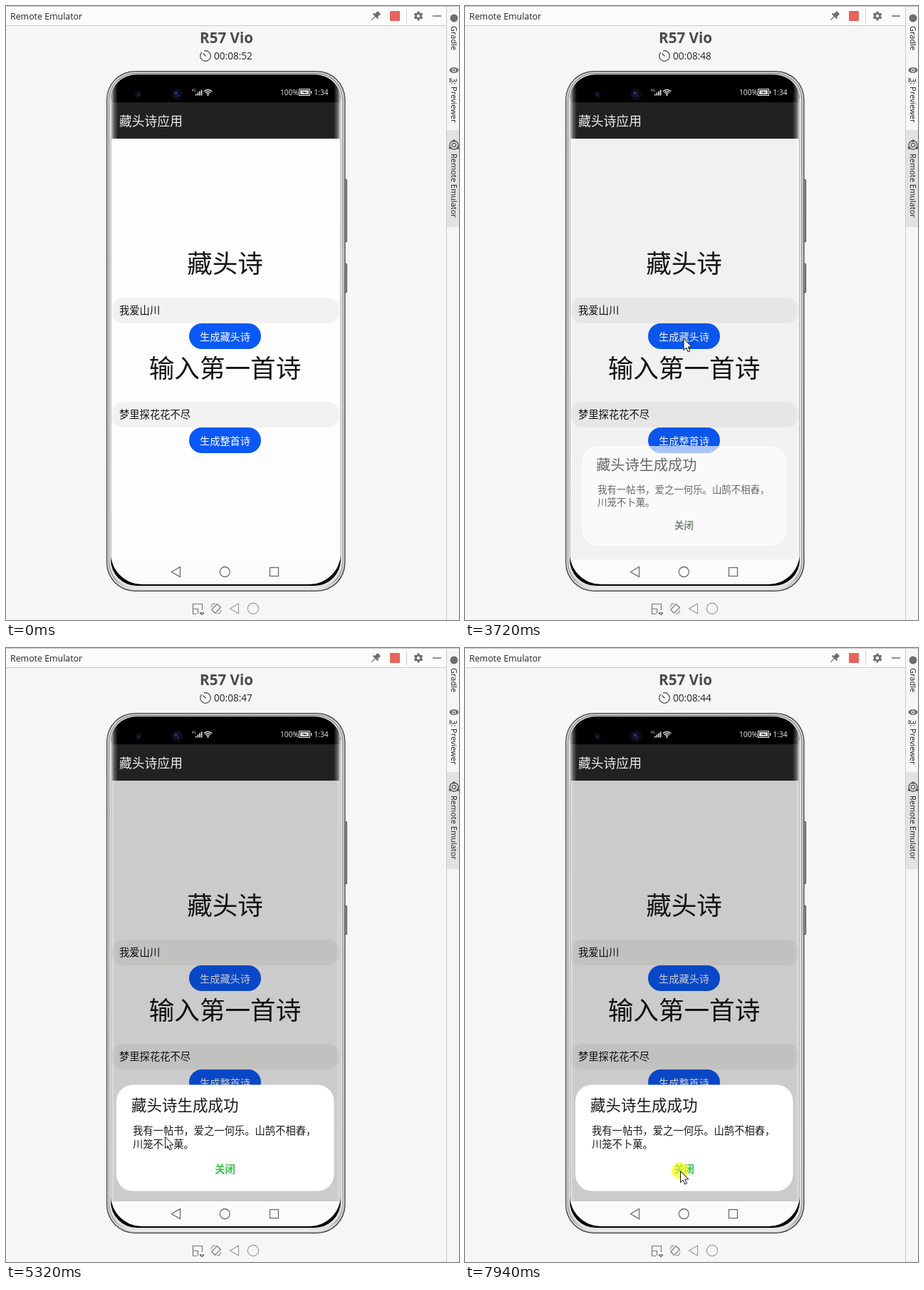
Animation, 636 px wide and 861 px high, one loop 8000 ms. Source, as an HTML page with a canvas:

```html
<!DOCTYPE html>
<html lang="zh-CN">
<head>
<meta charset="utf-8">
<title>Remote Emulator</title>
<style>
html, body { margin: 0; width: 100%; height: 100%; overflow: hidden; background: #f5f5f5; }
canvas { display: block; }
</style>
</head>
<body>
<canvas id="stage" width="636" height="861"></canvas>
<script>
const ctx = document.getElementById('stage').getContext('2d');
const LOOP = 8000;
const LATIN = '"Open Sans", "Noto Sans", sans-serif';
const CJK = '"Noto Sans CJK SC", "Noto Sans CJK", sans-serif';

// Cursor tip: time, x, y
const PATH = [
  [330, 609, 787], [540, 583, 690], [840, 583, 690], [1030, 539, 587],
  [1160, 539, 587], [1560, 549, 520], [1720, 549, 520], [2310, 306.5, 466],
  [4390, 306.5, 466], [4840, 404, 690], [4940, 404, 690], [5320, 223, 685],
  [5390, 223, 685], [5460, 177, 690], [5590, 208, 697], [5830, 208, 697],
  [6490, 313, 687], [6560, 313, 687], [6630, 351, 687], [6840, 409, 690],
  [7470, 304, 737], [7540, 302, 733], [8000, 302, 733]
];

// Dialog: time, scale, opacity, scrim
const DIALOG = [
  [3650, 0.9, 0.25, 0.015], [3720, 0.938, 0.65, 0.047],
  [3790, 1, 1, 0.173], [3910, 1, 1, 0.2]
];

const clamp = v => Math.max(0, Math.min(1, v));

function along(keys, t) {
  let i = 0;
  while (i < keys.length - 2 && t >= keys[i + 1][0]) i++;
  const a = keys[i], b = keys[i + 1], k = clamp((t - a[0]) / (b[0] - a[0]));
  return [a[1] + (b[1] - a[1]) * k, a[2] + (b[2] - a[2]) * k];
}

function box(x, y, w, h, color) {
  ctx.fillStyle = color;
  ctx.fillRect(x, y, w, h);
}

function round(x, y, w, h, r, color) {
  ctx.beginPath();
  ctx.roundRect(x, y, w, h, r);
  ctx.fillStyle = color;
  ctx.fill();
}

function disc(x, y, r, color) {
  ctx.beginPath();
  ctx.arc(x, y, r, 0, Math.PI * 2);
  ctx.fillStyle = color;
  ctx.fill();
}

function ring(x, y, r, color, width = 1.2) {
  ctx.beginPath();
  ctx.arc(x, y, r, 0, Math.PI * 2);
  ctx.strokeStyle = color;
  ctx.lineWidth = width;
  ctx.stroke();
}

function line(points, color, width = 1.2, closed = false) {
  ctx.beginPath();
  points.forEach(p => ctx.lineTo(...p));
  if (closed) ctx.closePath();
  ctx.strokeStyle = color;
  ctx.lineWidth = width;
  ctx.stroke();
}

function text(str, x, y, size, color, { weight = 400, align = 'left', family = LATIN } = {}) {
  ctx.font = `${weight} ${size}px ${family}`;
  ctx.textAlign = align;
  ctx.fillStyle = color;
  ctx.fillText(str, x, y);
}

// Chinese text placed by its vertical middle
function han(str, x, middle, size, color, options = {}) {
  text(str, x, middle + size * 0.38, size, color, { family: CJK, ...options });
}

function gradient(x0, y0, x1, y1, ...stops) {
  const g = ctx.createLinearGradient(x0, y0, x1, y1);
  stops.forEach(([at, color]) => g.addColorStop(at, color));
  return g;
}

function downward(str, x, y) {
  ctx.save();
  ctx.translate(x, y);
  ctx.rotate(Math.PI / 2);
  text(str, 0, 0, 11, '#1d1d1d');
  ctx.restore();
}

function drawToolbar() {
  box(0, 0, 636, 861, '#f6f6f6');
  box(0, 0, 618, 27, '#fcfcfc');
  box(0, 0, 636, 1, '#c4c4c4');
  box(0, 27, 618, 1, '#cccccc');
  text('Remote Emulator', 6, 19, 12.4, '#222');

  ctx.save();
  ctx.translate(519, 14);
  ctx.rotate(Math.PI / 4);
  box(-3, -7, 6, 7, '#6e6e6e');
  box(-5, -1, 10, 2, '#6e6e6e');
  box(-0.6, 0, 1.2, 8, '#6e6e6e');
  ctx.restore();

  round(539, 7, 14, 14, 1, '#e8635b');
  box(562, 4, 1, 20, '#d2d2d2');
  ring(579, 14, 3.6, '#6e6e6e', 2.8);
  for (let i = 0; i < 6; i++) {
    const a = (i + 0.5) * Math.PI / 3, c = Math.cos(a), s = Math.sin(a);
    line([[579 + c * 4, 14 + s * 4], [579 + c * 6.5, 14 + s * 6.5]], '#6e6e6e', 2.8);
  }
  box(599, 13.3, 12, 1.5, '#6e6e6e');
}

function drawSidebar() {
  box(618, 174, 18, 136, '#e2e2e2');
  box(618, 0, 1, 861, '#cbcbcb');
  disc(629, 17, 5.5, '#6e6e6e');
  downward('Gradle', 625, 28);

  ctx.beginPath();
  ctx.ellipse(629, 90, 6.5, 4, 0, 0, Math.PI * 2);
  ctx.fillStyle = '#6e6e6e';
  ctx.fill();
  disc(629, 90, 2.6, '#f6f6f6');
  disc(629, 90, 1.5, '#6e6e6e');
  downward('3: Previewer', 625, 101);
  box(623, 101, 1, 6, '#1d1d1d');

  ring(629, 195, 6, '#555', 1.4);
  ring(629, 195, 2.7, '#555', 1.2);
  disc(629, 189, 1.8, '#555');
  disc(623.5, 199, 1.8, '#555');
  disc(634.5, 199, 1.8, '#555');
  downward('Remote Emulator', 625, 207);
}

function drawHeading(t) {
  text('R57 Vio', 309.5, 52, 20.6, '#4b4b4b', { weight: 700, align: 'center' });
  ring(280, 70, 7.3, '#444', 1.2);
  line([[276.5, 66.5], [280.5, 70.5]], '#444', 1.3);
  box(274, 62, 4, 3, '#f6f6f6');
  const seconds = 52 - Math.max(0, Math.floor((t - 540) / 1008) + 1);
  text('00:08:' + seconds, 292, 75, 13.6, '#222');
}

function drawBody() {
  for (const [y, h] of [[243, 88], [361, 41]]) {
    round(473, y, 6, h, 1.5, '#444');
    round(474, y + 1, 4, h - 2, 1, '#a5a5a5');
  }
  round(141, 91, 335.5, 730, 40, '#3f3f3f');
  round(142.2, 92.2, 333, 727.5, 39, '#d5d5d5');
  round(144, 94, 329.5, 724, 38, gradient(0, 94, 0, 818, [0, '#6f6f6f'], [0.03, '#8d8d8d'], [0.98, '#a0a0a0'], [1, '#f0f0f0']));
  round(145.2, 95, 327, 721, 37, '#e2e2e2');
  round(147, 96, 323, 717, 37, '#000');
}

function drawStatus() {
  disc(186, 124, 5, '#0b0b13');
  disc(186, 124, 2, '#1c2152');
  disc(240, 123.5, 8, '#0d0d15');
  disc(239, 123, 4, '#12163a');
  disc(238.5, 122, 1.5, '#3840a0');
  disc(242, 126, 1, '#3840a0');

  text('4G', 261, 120, 4.5, '#eee');
  for (let i = 0; i < 4; i++) box(266 + i * 2.6, 123.5 - i * 2, 1.6, 2 + i * 2, '#eee');
  for (const r of [2.8, 5.2, 7.6]) {
    ctx.beginPath();
    ctx.arc(283.5, 125, r, -Math.PI * 0.77, -Math.PI * 0.23);
    ctx.strokeStyle = '#eee';
    ctx.lineWidth = 1.2;
    ctx.stroke();
  }
  disc(283.5, 124.6, 1.2, '#eee');
  text('100%', 385, 125, 10.2, '#eee');
  ctx.strokeStyle = '#eee';
  ctx.lineWidth = 1;
  ctx.strokeRect(411.5, 116.5, 15, 9);
  box(413, 118, 12, 6, '#ddd');
  line([[416, 121], [419.5, 120.5], [418.5, 122], [422.5, 121]], '#222', 1);
  box(428, 119, 1.3, 4, '#eee');
  text('1:34', 432.5, 125, 10.2, '#eee');
}

function drawField(label, y) {
  round(147, y, 322, 36, 18, '#f1f1f0');
  han(label, 159, y + 17.5, 14.3, '#111');
}

function drawButton(label, y, press = 0) {
  round(257, y, 101, 36, 18, '#0a59f7');
  if (press) round(257, y, 101, 36, 18, `rgba(0,0,0,${0.1 * press})`);
  han(label, 307.5, y + 18.5, 14.2, '#fff', { weight: 500, align: 'center' });
}

function drawDialog(t, scale, opacity) {
  ctx.save();
  ctx.globalAlpha = opacity;
  ctx.translate(307.5, 687);
  ctx.scale(scale, scale);
  ctx.translate(-307.5, -687.5);
  round(155, 613, 305.5, 149, 23, '#fff');
  han('藏头诗生成成功', 176, 641, 21.5, '#1a1a1a', { weight: 500 });
  han('我有一帖书，爱之一何乐。山鹄不相舂，', 178, 677.5, 14.3, '#1a1a1a');
  han('川笼不卜菓。', 178, 696.5, 14.3, '#1a1a1a');
  const k = clamp((t - 3600) / 600);
  const green = `rgb(${48 + 12 * k},${58 + 140 * k},${48 + 32 * k})`;
  han('关闭', 307.5, 731, 14.3, green, { weight: 700, align: 'center' });
  ctx.restore();
}

function drawNav() {
  box(147, 776, 323, 36, '#fbfbfb');
  line([[232.5, 793.5], [244.5, 786.5], [244.5, 800.5]], '#6c6c6c', 1.3, true);
  ring(307.3, 793.5, 7, '#6c6c6c', 1.3);
  ctx.strokeRect(370.5, 787.5, 12, 12);
}

function drawEdges() {
  const from = 'rgba(255,255,255,.85)', to = 'rgba(255,255,255,0)';
  const faint = 'rgba(255,255,255,.35)';
  const sides = [[147, 157], [470, 460]];
  for (const [outer, inner] of sides) {
    const x = Math.min(outer, inner);
    box(x, 96, 10, 90, gradient(outer, 0, inner, 0, [0, from], [0.45, 'rgba(255,255,255,.3)'], [1, to]));
    box(x, 186, 10, 626, gradient(outer, 0, inner, 0, [0, faint], [0.7, to]));
  }
  box(147, 186, 1, 590, '#bdb8bb');
  box(469, 186, 1, 590, '#bdb8bb');
}

function drawScreen(t) {
  ctx.save();
  ctx.beginPath();
  ctx.roundRect(147, 97, 323, 714, [34, 34, 44, 44]);
  ctx.clip();
  box(147, 97, 323, 38, '#000');
  box(147, 135, 323, 51, '#212121');
  han('藏头诗应用', 159, 161.5, 17.8, '#ededed');
  drawStatus();

  box(147, 186, 323, 590, '#fdfdfd');
  han('藏头诗', 307.5, 360.5, 35.6, '#151515', { align: 'center' });
  drawField('我爱山川', 409);
  drawButton('生成藏头诗', 445, clamp((t - 3090) / 80) * clamp((3450 - t) / 80));
  han('输入第一首诗', 307.5, 507, 35.6, '#151515', { align: 'center' });
  drawField('梦里探花花不尽', 555);
  drawButton('生成整首诗', 591);

  const state = DIALOG.filter(k => k[0] <= t).pop();
  if (state) {
    box(147, 186, 323, 590, `rgba(0,0,0,${state[3]})`);
    drawDialog(t, state[1], state[2]);
  }
  drawNav();
  drawEdges();
  ctx.restore();
}

function drawControls() {
  const grey = '#9a9a9a';
  line([[268, 852.5], [262.5, 852.5], [262.5, 838.5], [275.5, 838.5], [275.5, 847]], '#777', 1.2);
  line([[262.5, 845.5], [269.5, 845.5], [269.5, 852]], '#777', 1.2);
  line([[272, 851], [278, 851], [275, 854]], '#333', 1, true);

  ctx.save();
  ctx.translate(295, 845);
  ctx.rotate(Math.PI / 4);
  ctx.strokeStyle = '#777';
  ctx.lineWidth = 1.2;
  ctx.strokeRect(-3.5, -5.5, 7, 11);
  ctx.restore();
  line([[288, 843], [290, 838.5], [294, 838]], '#777', 1);
  line([[296, 852], [300, 851.5], [302, 847]], '#777', 1);

  line([[314.5, 845], [326.5, 838], [326.5, 852]], grey, 1.1, true);
  ring(347, 845, 7.7, grey, 1.2);
}

function drawCursor(t) {
  if (t < 330) return;
  const [x, y] = along(PATH, t);
  if ((t >= 2510 && t < 2650) || t >= 7940) disc(x, y, 12, 'rgba(255,255,0,.6)');
  ctx.save();
  ctx.translate(x + 0.5, y + 0.5);
  ctx.fillStyle = '#fff';
  ctx.beginPath();
  [[0, 0], [0, 16], [3.7, 12.6], [6.3, 18.5], [8.9, 17.3], [6.3, 11.6], [11.3, 11.3]]
    .forEach(p => ctx.lineTo(...p));
  ctx.closePath();
  ctx.fill();
  ctx.strokeStyle = '#111';
  ctx.lineWidth = 1;
  ctx.stroke();
  ctx.restore();
}

function frame(now) {
  const t = now % LOOP;
  drawToolbar();
  drawSidebar();
  drawHeading(t);
  drawBody();
  drawScreen(t);
  drawControls();
  drawCursor(t);
}

const start = performance.now();
function tick() {
  frame(performance.now() - start);
  requestAnimationFrame(tick);
}
tick();
</script>
</body>
</html>
```
